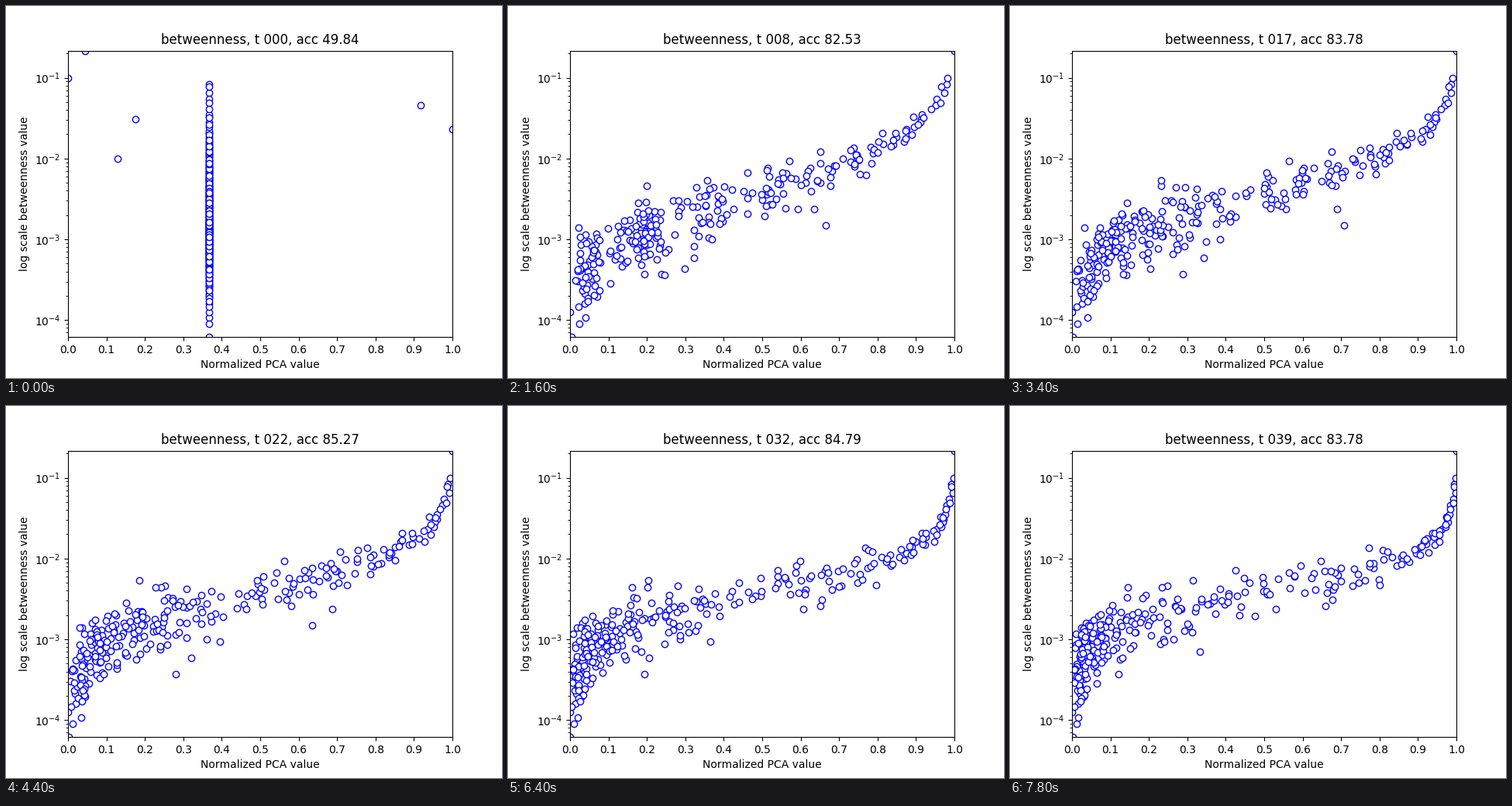
Animation, 640 px wide and 480 px high, one loop 8000 ms. Source, as a matplotlib script:

```python
import numpy as np
import matplotlib.pyplot as plt
from matplotlib.animation import FuncAnimation

STEPS = 40
N = 290
BOTTOM, MID, TOP = -4.21, -2.78, -.665   # log10 of betweenness
REST = .367                              # shared PCA value before training
SETTLED = 8                              # step at which the first sort is done

# Nodes that start off the shared line: PCA value, log10 of betweenness
LONERS = [(.045, TOP), (.498, -.912), (.41, -.95), (0, -1.008),
          (.918, -1.345), (.175, -1.515), (1, -1.64), (.13, -2)]

# Accuracy printed in the title
ACC_STEPS = [8, 17, 22, 28, 32, 39]
ACC = [82.53, 83.78, 85.27, 85.20, 84.79, 83.78]
ACC_START = 49.84

rng = np.random.default_rng(12)


def bell_levels():
    """Log values on a skewed bell: wider above the middle than below."""
    rank = np.arange(N) + .5
    rank[1:-1] += rng.uniform(-.45, .45, N - 2)
    p = 1 - rank / N
    q = p ** .135 - (1 - p) ** .135
    q /= q.max()
    return MID + q * np.where(q > 0, TOP - MID, MID - BOTTOM)


level = bell_levels()
start = np.full(N, REST)
for x, y in LONERS:
    node = np.abs(level - y).argmin()
    start[node], level[node] = x, y

values = 10 ** level
spread = np.clip(-.2 - .15 * level, .06, .27)
base, sway_a, sway_b, jitter = rng.normal(size=(4, N))
order = rng.permutation(N)


def rise(t):
    return 1 - (1 - min(t / SETTLED, 1)) ** 3


def trained(t):
    """Logistic curve that steepens over time; early on it has steps."""
    z = .87 * base + .5 * (sway_a * np.cos(t / 9) + sway_b * np.sin(t / 9))
    slope = 2.6 + .055 * (t - SETTLED)
    x = 1 / (1 + np.exp(-slope * (level + spread * z + 2.36)))
    step = .155
    pull = max(0, 1 - (t - SETTLED) / 9) * (1 - x)
    x -= pull * step / 7 * np.sin(2 * np.pi * (x - .05) / step)
    return x + .08 / slope * np.abs(jitter) * (1 - x)


def positions(t):
    x = start + (trained(max(t, SETTLED)) - start) * rise(t)
    return (x - x.min()) / np.ptp(x)


def accuracy(t):
    if t < SETTLED:
        return ACC_START + (ACC[0] - ACC_START) * rise(t)
    return np.interp(t, ACC_STEPS, ACC)


plt.rcParams["text.kerning_factor"] = 6
fig, ax = plt.subplots(figsize=(6.4, 4.8), dpi=100)
dots, = ax.plot([], [], "o", mfc="white", mec="blue", ms=6, mew=1)
ax.set_yscale("log")
ax.set_xlim(0, 1)
ax.set_ylim(10 ** BOTTOM, 10 ** TOP)
ax.set_xticks(np.arange(11) / 10)
ax.set_xlabel("Normalized PCA value")
ax.set_ylabel("log scale betweenness value")
title = ax.set_title("")


def draw(t):
    dots.set_data(positions(t)[order], values[order])
    title.set_text(f"betweenness, t {t:03d}, acc {accuracy(t):.2f}")
    return dots, title


anim = FuncAnimation(fig, draw, frames=STEPS, interval=200,
                     repeat=True, repeat_delay=0)
plt.show()
```
